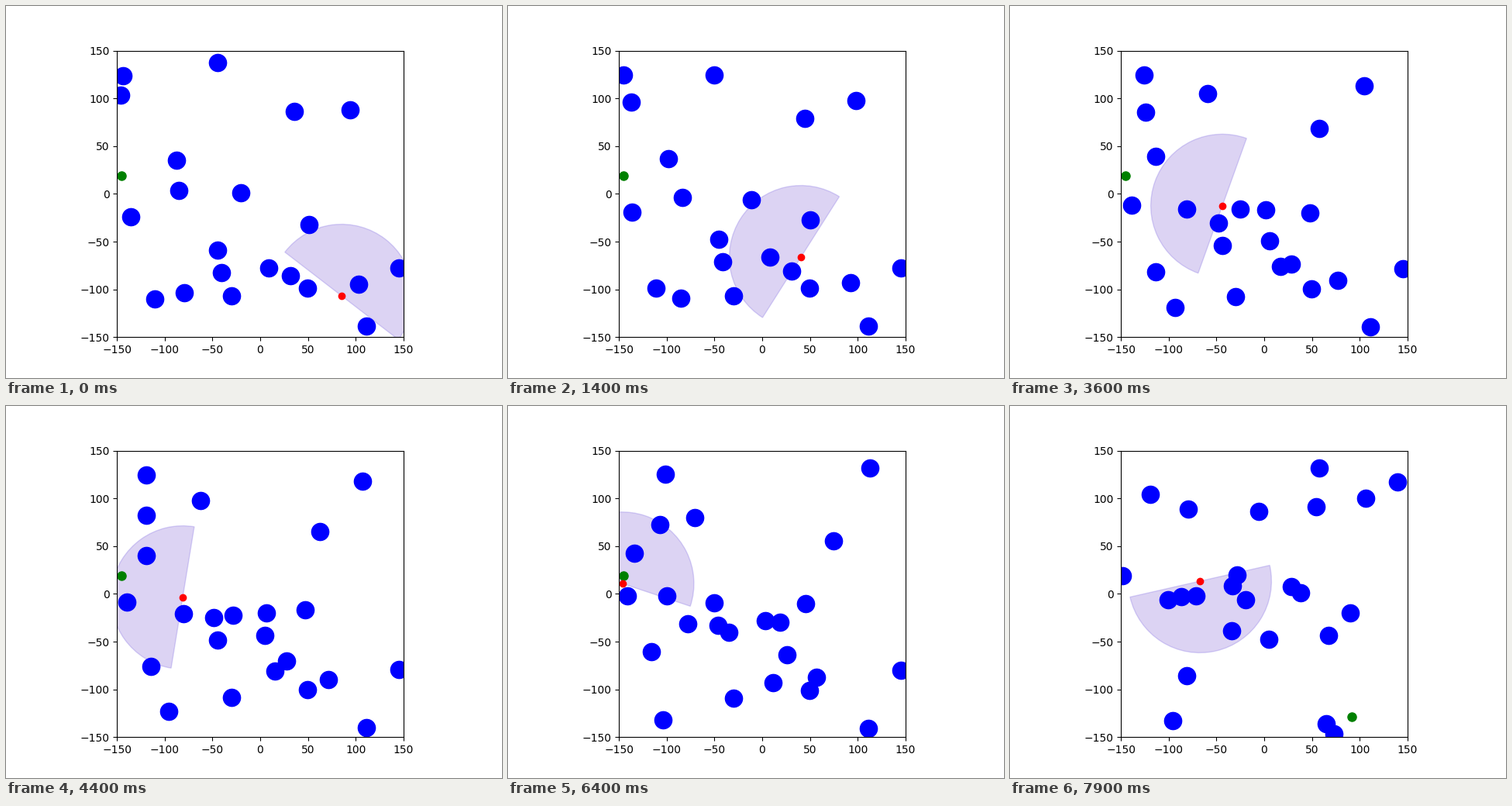
A matplotlib script that plays this animation: 640 px wide and 480 px high, repeating every 8000 ms.

```python
import numpy as np
import matplotlib.pyplot as plt
from matplotlib.animation import FuncAnimation
from matplotlib.patches import Wedge

FRAMES, STEP = 80, 100
RESET = 66                      # second run begins
LEFT, TOP, SCALE = 143.2, 57.6, 1.232
WALL = 142.6
MAX_BALLS = 24                  # the oldest gives way to a new one

# Flocks: frame of birth, shared drift per frame, and where each member
# is at the run's reference frame, in stage pixels.
RUN_1 = dict(ref=28, goal=(149, 219), flocks=[
    (0, (-.11, -.95), [(270, 288), (275, 317), (189, 351), (336, 311)]),
    (0, (-.11, -.43), [(158, 260), (364, 336), (388, 270)]),
    (0, (0, .05), [(291, 375), (389, 365), (465, 414), (507, 339)]),
    (0, (.74, .59), [(393, 153), (169, 132), (324, 258)]),
    (0, (-.89, -.14), [(195, 195), (430, 355)]),
    (0, (-.5, 1.1), [(259, 104)]),
    (0, (-.46, .55), [(217, 385)]),
    (0, (.14, .68), [(227, 257)]),
    (0, (.37, -.84), [(454, 110)]),
    (0, (1.07, -.02), [(164, 89)]),
    (15, (-.25, .75), [(351, 330)]),
    (30, (-.42, 1.08), [(300, 253)]),
    (45, (0, 0), [(205, 245)])])
RUN_2 = dict(ref=72, goal=(441, 401), flocks=[
    (0, (0, 0), [(343, 356), (459, 119), (500, 98), (204, 250), (145, 219),
                 (286, 290), (210, 406), (408, 410)]),
    (0, (0, -1.1), [(181, 122), (230, 141), (304, 258), (375, 249)]),
    (0, (.4, -.6), [(396, 84), (392, 134), (318, 140), (284, 236),
                    (360, 237), (225, 352)]),
    (0, (-.75, -.1), [(444, 268), (339, 302), (423, 424)]),
    (0, (0, .65), [(293, 213), (411, 291)]),
    (0, (.86, .43), [(215, 243)]),
    (78, (0, 0), [(240, 245)])])

# robot way points: time, x, y, heading in degrees
PATH_1 = [(0, 433, 374, 52.4), (14, 378, 324, 147.6), (28, 313, 282, 133.9),
          (44, 228, 247, 170.7), (50, 196, 262, 186), (56, 162, 263, 162.7),
          (60, 146, 246, 105), (65, 149, 225, 70)]
PATH_2 = [(66, 219, 161, -62), (72, 234.4, 191.4, -64.1),
          (79, 245, 226, -77.2)]


def to_data(p):
    """Stage pixels to axes units."""
    p = np.asarray(p, float)
    return (p[..., 0] - LEFT) / SCALE - 150, 150 - (p[..., 1] - TOP) / SCALE


def robot(t):
    """Position and heading on a cubic through the way points."""
    path = PATH_1 if t < RESET else PATH_2
    i = min(sum(k[0] <= t for k in path), len(path) - 1)
    (t0, *a, ha), (t1, *b, hb) = path[i - 1], path[i]
    a, b = np.array(a), np.array(b)
    reach = 1.05 * np.hypot(*(b - a))
    ma, mb = (reach * np.array([np.cos(h), -np.sin(h)])
              for h in np.radians([ha, hb]))
    u = (t - t0) / (t1 - t0)
    c2, c3 = 3 * (b - a) - 2 * ma - mb, 2 * (a - b) + ma + mb
    pos = a + u * (ma + u * (c2 + u * c3))
    vx, vy = ma + u * (2 * c2 + 3 * u * c3)
    return pos, np.degrees(np.arctan2(-vy, vx))


def obstacles(t, run):
    """Straight drifts that bounce off the left wall."""
    pts = np.vstack([np.add(members, np.multiply(drift, t - run["ref"]))
                     for birth, drift, members in run["flocks"]
                     if t >= birth])[-MAX_BALLS:]
    pts[:, 0] = WALL + abs(pts[:, 0] - WALL)
    return pts


fig, ax = plt.subplots(figsize=(6.4, 4.8), dpi=100)
ax.set_aspect("equal")
ticks = range(-150, 151, 50)
ax.set(xlim=(-150, 150), ylim=(-150, 150), xticks=ticks, yticks=ticks)

view = Wedge((0, 0), 75, 0, 180, fc=(.33, .14, .78, .2),
             ec=(.3, .2, .85, .2), lw=1)
ax.add_patch(view)
balls, = ax.plot([], [], "bo", ms=16)
goal, = ax.plot([], [], "o", color="green", ms=8)
body, = ax.plot([], [], "ro", ms=6)


def update(t):
    run = RUN_1 if t < RESET else RUN_2
    balls.set_data(*to_data(obstacles(t, run)))
    goal.set_data(*to_data([run["goal"]]))
    pos, head = robot(t)
    body.set_data(*to_data([pos]))
    view.set_center(to_data(pos))
    view.set_theta1(head - 90)
    view.set_theta2(head + 90)
    return view, balls, goal, body


anim = FuncAnimation(fig, update, frames=FRAMES, interval=STEP,
                     repeat=True, repeat_delay=0, blit=False)
plt.show()
```
